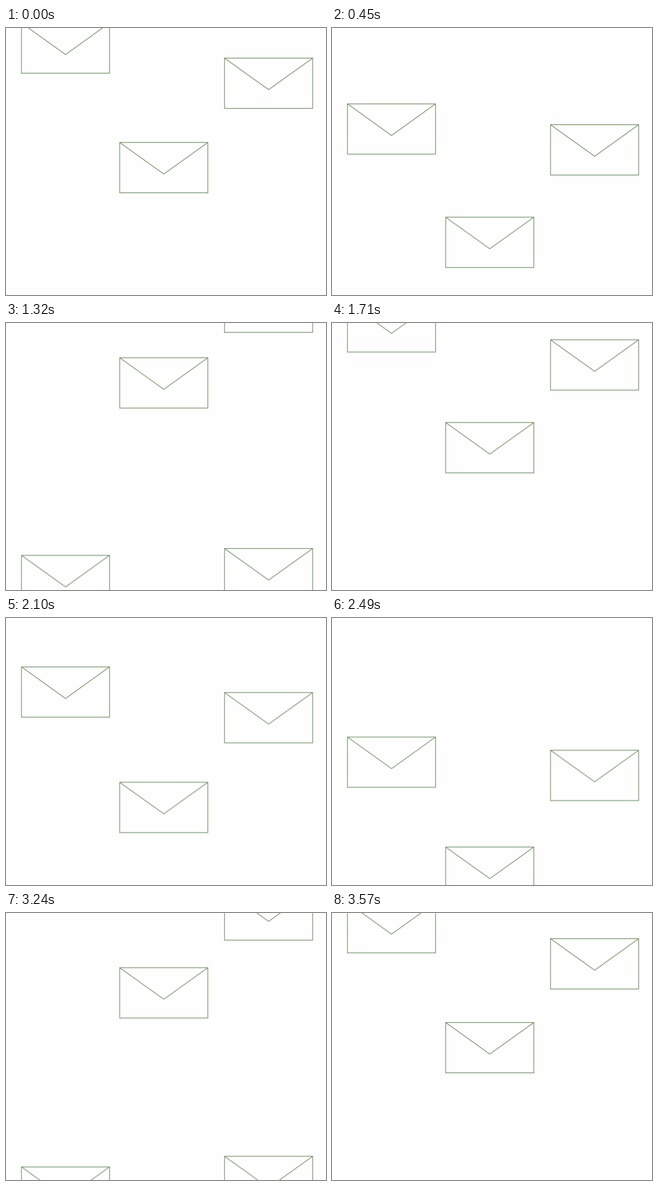
Animation, 580 px wide and 485 px high, one loop 3600 ms. Source, as an HTML page:

```html
<!DOCTYPE html>
<html lang="en">
<head>
<meta charset="utf-8">
<title>Falling envelopes</title>
<style>
  html, body { margin: 0; width: 100%; height: 100%; overflow: hidden; background: #fefefe; }
  svg { display: block; }
  path { fill: none; stroke: #6a8f5d; stroke-width: 1.2; stroke-linejoin: miter; }
</style>
</head>
<body>
<svg id="stage" width="580" height="485" viewBox="0 0 580 485"></svg>
<script>
  const NS = 'http://www.w3.org/2000/svg';
  const PERIOD = 1800, STEPS = 60;
  const ENVELOPE = 'M0 0H159.7V91.4H0ZL79.9 57.4L159.7 0';

  // pitch: distance between successive envelopes, covered once per period
  const columns = [
    { x: 28, y: -9.2, pitch: 588 },
    { x: 206.1, y: 207.9, pitch: 543 },
    { x: 396.1, y: 54.7, pitch: 484 }
  ];

  function add(parent, tag, attrs = {}) {
    const el = document.createElementNS(NS, tag);
    for (const key in attrs) el.setAttribute(key, attrs[key]);
    return parent.appendChild(el);
  }

  const stage = document.getElementById('stage');

  for (const { x, y, pitch } of columns) {
    const column = add(stage, 'g');
    for (const top of [y, y - pitch]) {
      add(column, 'path', { d: ENVELOPE, transform: `translate(${x} ${top})` });
    }
    column.animate(
      [{ transform: 'translateY(0px)' }, { transform: `translateY(${pitch}px)` }],
      { duration: PERIOD, iterations: Infinity, easing: `steps(${STEPS}, end)` }
    );
  }
</script>
</body>
</html>
```
